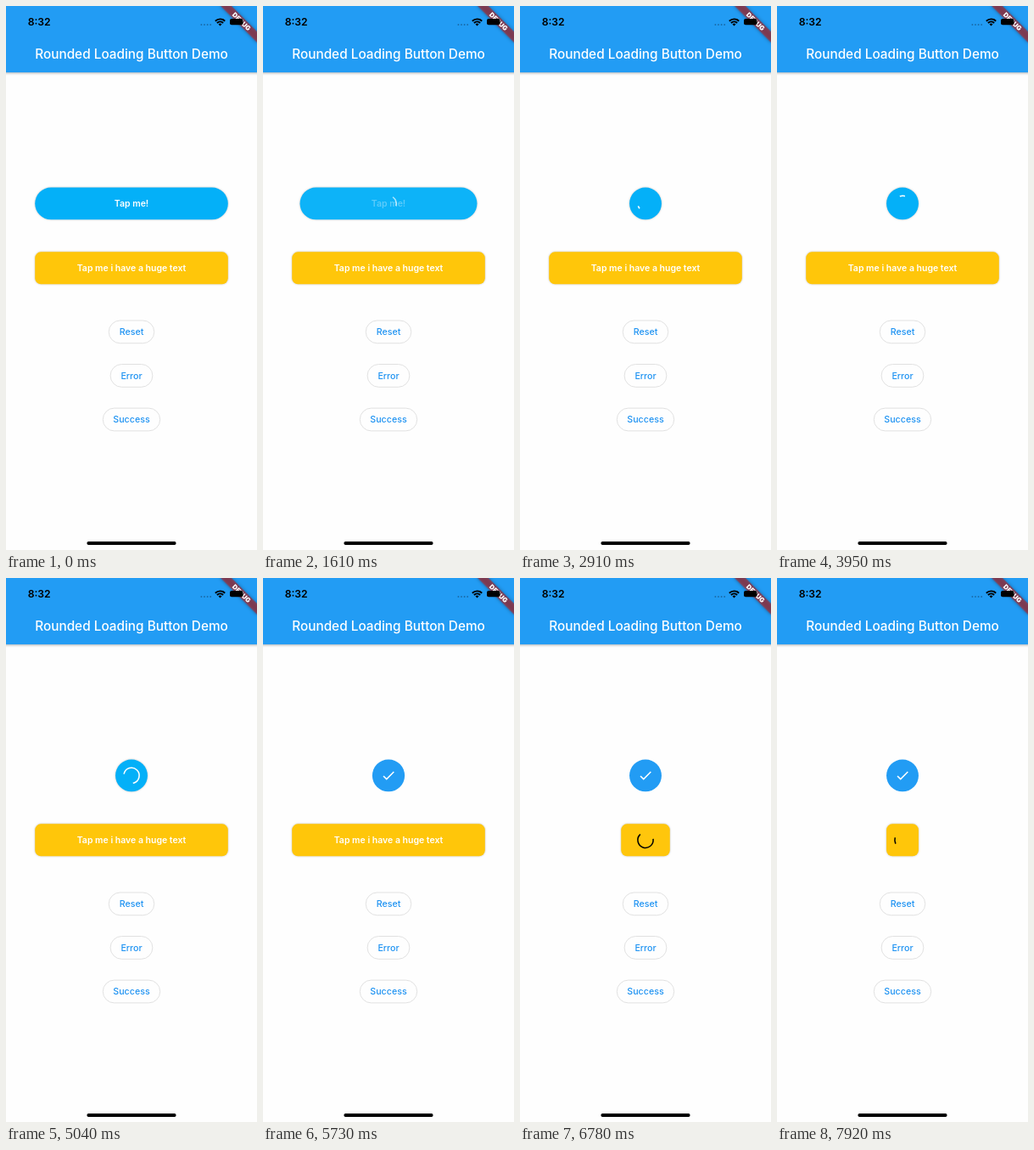
Write an HTML page that moves like this. It is 296 by 640 pixels and loops after 8000 ms.

```html
<!DOCTYPE html>
<html lang="en">
<head>
<meta charset="utf-8">
<title>Rounded Loading Button Demo</title>
<style>
  html, body { margin: 0; width: 100%; height: 100%; overflow: hidden; background: #fefefe; }
  svg { display: block; width: 100vw; height: 100vh; }
  text { font-family: Inter, Roboto, sans-serif; font-weight: 500; text-anchor: middle; }
  .label { font-size: 10.5px; font-weight: 600; }
  .plain { font-size: 10.7px; }
  .raised { filter: drop-shadow(0 .8px .8px rgba(0, 0, 0, .24)); }
  .bar { filter: drop-shadow(0 1px 1.5px rgba(0, 0, 0, .3)); }
  .ribbon { filter: drop-shadow(0 0 2px rgba(0, 0, 0, .5)); }
  .arc { fill: none; stroke-width: 1.55; stroke-linecap: square; }
</style>
</head>
<body>
<svg viewBox="0 0 296 640" xmlns="http://www.w3.org/2000/svg">
  <rect width="296" height="640" fill="#fefefe"/>
  <rect class="bar" x="-6" y="-6" width="308" height="84.1" fill="#229cf4"/>
  <text x="148" y="62.4" font-size="15.35" fill="#fff">Rounded Loading Button Demo</text>

  <g id="tap"></g>
  <g id="done">
    <rect id="disc" fill="#229cf4"/>
    <path id="tick" fill="#fff" transform="translate(138.9 223.3) scale(.759)"
      d="M9 16.17 4.83 12l-1.42 1.41L9 19 21 7l-1.41-1.41z"/>
  </g>
  <g id="huge"></g>
  <g id="actions"></g>

  <g transform="translate(296 0) rotate(45)">
    <rect class="ribbon" x="-31" y="21.25" width="62" height="9.1" fill="#b71c1c" fill-opacity=".63"/>
    <text x="0" y="28.6" font-size="7.7" fill="#fff" style="font-weight:900">DEBUG</text>
  </g>

  <text x="39.2" y="23.3" font-size="12.2" style="font-weight:600">8:32</text>
  <g fill="#1a6cab">
    <circle cx="230.4" cy="22" r=".95"/><circle cx="234" cy="22" r=".95"/>
    <circle cx="237.6" cy="22" r=".95"/><circle cx="241.2" cy="22" r=".95"/>
  </g>
  <g fill="none" stroke="#000" stroke-width="1.9">
    <path d="M246.8 17.7a8.2 8.2 0 0 1 11.4 0"/>
    <path d="M248.9 20a5.1 5.1 0 0 1 7.2 0"/>
    <path d="M250.5 21.4a2.9 2.9 0 0 1 4 0L252.5 23.4z" fill="#000" stroke="none"/>
  </g>
  <rect x="264" y="15" width="15.5" height="7.2" rx="2" fill="#000"/>
  <rect x="95.4" y="630.1" width="105.2" height="3.8" rx="1.9" fill="#000"/>
</svg>
<script>
const LOOP = 8000, CX = 148, FULL = 227.6, SIZE = 37.9, RADIUS = 9.1;
const SUCCESS = 5085;
const $ = id => document.getElementById(id);

// The picture moves in steps: [first, last, count]
const steps = [
  [0, 0, 1], [1420, 1420, 1], [1610, 2220, 6], [2360, 3140, 8], [3240, 3950, 7],
  [4060, 4060, 1], [4200, 4910, 7], [5040, 5730, 7], [5870, 6010, 2],
  [6350, 6460, 2], [6670, 6780, 2], [6930, 7300, 4], [7440, 7920, 5]
].flatMap(([a, b, n]) => Array.from({ length: n }, (_, i) =>
  n > 1 ? Math.floor((a + (b - a) * i / (n - 1)) / 10) * 10 : a));

const snap = t => steps.filter(s => s <= t).pop();
const clamp = v => Math.min(1, Math.max(0, v));

function bezier(x1, y1, x2, y2) {
  const at = (a, b, s) => 3 * a * s * (1 - s) ** 2 + 3 * b * s * s * (1 - s) + s ** 3;
  return x => {
    if (x <= 0 || x >= 1) return clamp(x);
    let lo = 0, hi = 1;
    for (let i = 0; i < 24; i++) {
      const mid = (lo + hi) / 2;
      if (at(x1, x2, mid) < x) lo = mid; else hi = mid;
    }
    return at(y1, y2, lo);
  };
}
const inOutCirc = bezier(.785, .135, .15, .86);
const fastOutSlowIn = bezier(.4, 0, .2, 1);
const elasticOut = t => t >= 1 ? 1 : 1 + 2 ** (-10 * t) * Math.sin((t - .1) * Math.PI * 5);

function setAttrs(el, attrs) {
  for (const k in attrs) el.setAttribute(k, attrs[k]);
}

function box(el, w, h, cy, r) {
  setAttrs(el, { x: CX - w / 2, y: cy - h / 2, width: w, height: h, rx: r });
}

// Spinner: head runs ahead, tail catches up, the whole turns
function arcPath(ms, cy) {
  const phase = ms / 1333 % 1;
  const head = fastOutSlowIn(clamp(phase * 2));
  const tail = fastOutSlowIn(clamp(phase * 2 - 1));
  const from = Math.PI * (-.5 + 1.5 * tail + 2 * (ms / 2222 % 1) + .5 * phase);
  const sweep = Math.max(1.5 * Math.PI * (head - tail), .01);
  const point = a => `${CX + RADIUS * Math.cos(a)} ${cy + RADIUS * Math.sin(a)}`;
  return `M${point(from)}A${RADIUS} ${RADIUS} 0 ${+(sweep > Math.PI)} 1 ${point(from + sweep)}`;
}

// The spinner's clock runs slightly slow
const spinTime = ms => Math.max(0, ms * .96 + 37);

function loadingButton({ id, label, cy, radius, fill, ink, press, start }) {
  const root = $(id);
  root.innerHTML = `<rect class="raised" fill="${fill}"/><rect fill="#fff"/>
    <text class="label" x="${CX}" y="${cy + 3.8}" fill="#fff">${label}</text>
    <path class="arc" stroke="${ink}"/>`;
  const [body, glow, text, arc] = root.children;
  return t => {
    const width = FULL - (FULL - SIZE) * inOutCirc(clamp((t - start) / 500));
    const swap = clamp((t - start) / 200);
    const lit = t < press ? 0 : .06 * clamp(1 - (t - press) / 500);
    box(body, width, SIZE, cy, radius);
    box(glow, width, SIZE, cy, radius);
    glow.setAttribute("opacity", lit);
    text.setAttribute("opacity", 1 - swap);
    setAttrs(arc, { opacity: swap, d: arcPath(spinTime(t - start), cy) });
  };
}

const drawTap = loadingButton({
  id: "tap", label: "Tap me!", cy: 232.4, radius: SIZE / 2,
  fill: "#04b0f8", ink: "#fff", press: 1400, start: 1475
});
const drawHuge = loadingButton({
  id: "huge", label: "Tap me i have a huge text", cy: 308.3, radius: 7,
  fill: "#ffc60a", ink: "#000", press: 6340, start: 6430
});

$("actions").innerHTML = [["Reset", 53.5, 383.4], ["Error", 49.8, 434.9], ["Success", 67.4, 486.5]]
  .map(([label, w, cy]) => `<rect x="${CX - w / 2}" y="${cy - 13.4}" width="${w}" height="26.8" rx="13.4"
    fill="none" stroke="#dedede" stroke-width=".9"/>
    <text class="plain" x="${CX}" y="${cy + 3.8}" fill="#1f93f2">${label}</text>`).join("");

function draw(time) {
  const t = snap(time % LOOP);
  const done = t >= SUCCESS;
  $("tap").style.display = done ? "none" : "";
  $("done").style.display = done ? "" : "none";
  drawTap(t);
  drawHuge(t);
  if (done) {
    const width = SIZE * Math.max(0, elasticOut((t - SUCCESS) / 1000));
    const height = Math.min(SIZE, width);
    box($("disc"), width, height, 232.4, height / 2);
    $("tick").style.display = width > SIZE * .4 ? "" : "none";
  }
}

const begin = performance.now();
function tick() {
  draw(performance.now() - begin);
  requestAnimationFrame(tick);
}
tick();
</script>
</body>
</html>
```
